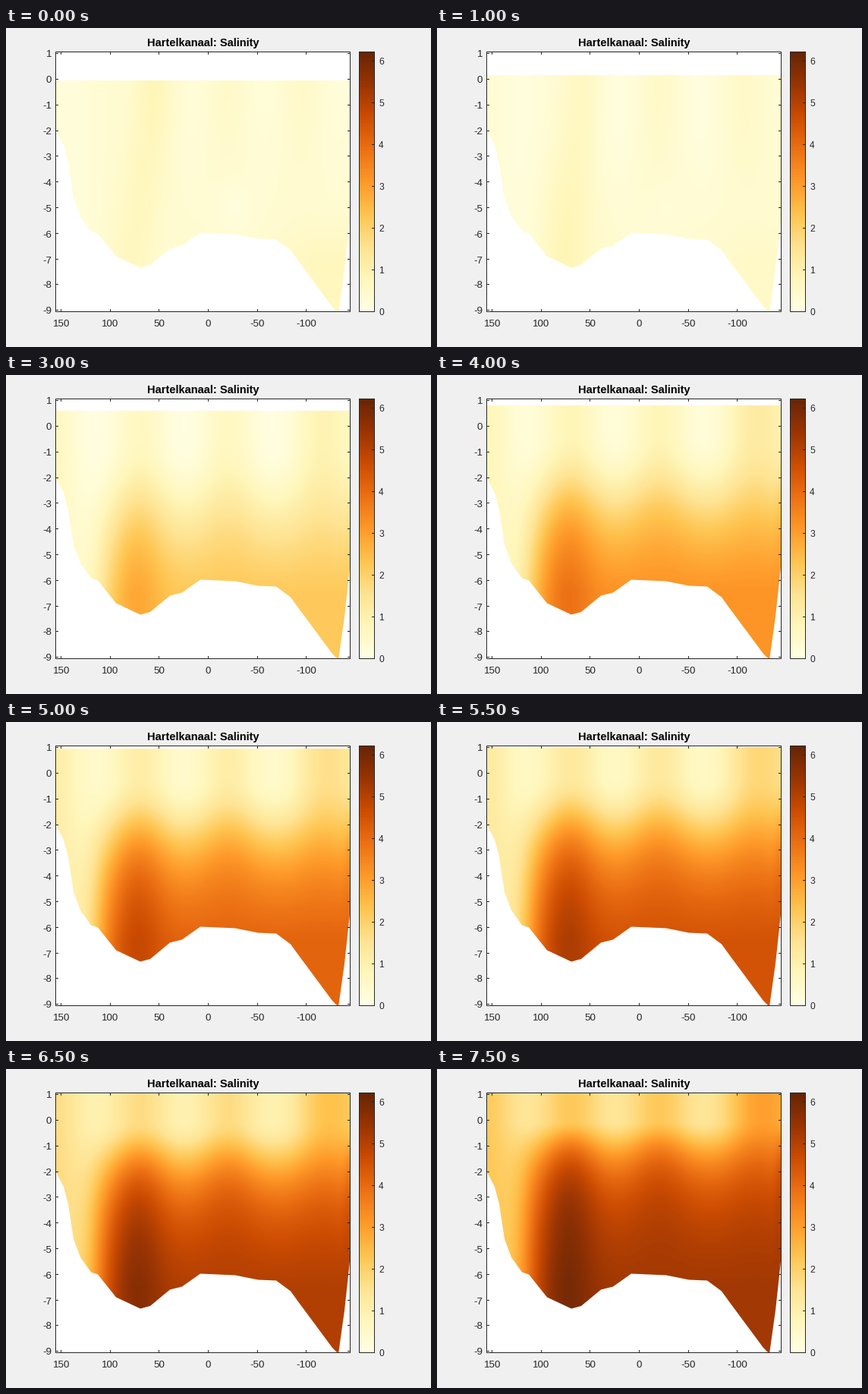
These frames come from a looping animation (560 by 420 pixels, 8000 ms). A matplotlib script:

```python
import numpy as np
import matplotlib.pyplot as plt
from matplotlib.animation import FuncAnimation
from matplotlib.patches import Polygon, Rectangle

W, H, DPI = 560, 420, 100
L, R, T, B = 65, 454, 31, 374        # plot box in pixels
BAR_L, BAR_R = 465, 486
FRAMES, STEP = 16, 500
TIDE = 2 * np.pi / 17800             # radians per ms
S_MAX = 6.225
INK = "#262626"

plt.rcParams["font.family"] = "Liberation Sans"


def px_x(v):
    return 266.5 - 1.292 * v


def px_y(v):
    return 67.5 - 33.8 * v


def rise(x, a, b):
    """Smooth step from 0 at a to 1 at b."""
    s = np.clip((x - a) / (b - a), 0, 1)
    return s * s * (3 - 2 * s)


def bell(x, mid, width):
    return np.exp(-((x - mid) / width) ** 2)


def sigmoid(x, mid, width):
    return 1 / (1 + np.exp(-(x - mid) / width))


def hill(d, mid, power):
    h = (d / mid) ** power
    return h / (1 + h)


X, Y = np.meshgrid(np.arange(L, R) + 0.5, np.arange(T, B) + 0.5)
DEEP = 6.5
depth = np.clip((Y - px_y(0)) / 33.8, 0, DEEP)
swell = np.cos(2 * np.pi * (X - 177) / 116)


def slack_water():
    """Almost fresh water with faint vertical bands."""
    bands = 0.14 * np.cos(2 * np.pi * (X - 195) / 97) * rise(X, 130, 200)
    ridge = 0.33 * bell(X + 0.13 * (Y - 69), 196, 28)
    seabed = 0.4 * rise(X, 320, 420) * rise(Y, 220, 330)
    pool = 0.22 * bell(X, 300, 25) * bell(Y, 235, 35)
    bank = 0.18 * bell(X, 80, 35)
    return 0.38 + bands * bell(depth, 0, 3.5) + ridge + seabed - pool - bank


def flood_water(t):
    """Salt wedge: a fresher top over a bottom that follows the tide."""
    u = np.clip((t - 1500) / 6000, 0, 1)
    top = (0.28 + 1.55 * u ** 2 + (0.25 + 0.13 * u) * swell
           + (0.25 + u) * rise(X, 370, 454))
    bottom = (2.4 + 2.9 * np.sin(TIDE * (t - 3200))
              + 0.7 * bell(X, 171, 35))
    mid = (4.25 - 2.65 * u ** 1.5 - 0.22 * swell
           + 0.7 * rise(X, 340, 420) - bell(X, 454, 9))
    power = 3.2 - 1.5 * u
    share = hill(depth, mid, power) / hill(DEEP, mid, power)
    share *= sigmoid(X, 124 - 8 * u, 13)
    return np.maximum(top + (bottom - top) * share, 0.05)


def salinity(i):
    t = i * STEP
    mix = min(t / 2000, 1)
    s = mix * flood_water(t) + (1 - mix) * slack_water()
    surface = np.round(52.9 - 22 * np.sin(TIDE * (t - 2250)))
    return np.ma.masked_where(Y < surface, s)


BED = [(L, 134), (76, 155), (82, 178), (89, 224), (98, 248), (112, 267.5),
       (121, 270.5), (145, 300.5), (177, 315.5), (190, 312), (216, 290.5),
       (232, 286.5), (256, 269.5), (302, 271.5), (332, 277.5), (356, 278.5),
       (375, 292.5), (384, 305), (430, 367), (438, 375), (446, 318), (R, 244)]

fig = plt.figure(figsize=(W / DPI, H / DPI), dpi=DPI, facecolor="#f0f0f0")
ax = fig.add_axes([0, 0, 1, 1])
ax.set_axis_off()


def line(x, y):
    ax.plot(x, y, color=INK, lw=0.72, solid_capstyle="butt", snap=False,
            zorder=4)


def label(x, y, text, px, **kw):
    kw = {"ha": "center", "va": "baseline", "color": INK, **kw}
    ax.text(x, y, text, fontsize=px * 72 / DPI, **kw)


def frame(l, r):
    ax.add_patch(Rectangle((l + 0.5, T + 0.5), r - l - 1, B - T - 1, snap=False,
                           fill=False, ec=INK, lw=0.72, zorder=4))


ax.add_patch(Rectangle((L, T), R - L, B - T, color="white", lw=0))
style = dict(cmap="YlOrBr", vmin=0, vmax=S_MAX, aspect="auto",
             interpolation="nearest")
water = ax.imshow(salinity(0), extent=(L, R, B, T), zorder=2, **style)
ax.add_patch(Polygon([(L, B)] + BED + [(R, B)], fc="white", lw=0, snap=False,
                     zorder=3))
ax.imshow(np.linspace(S_MAX, 0, 256)[:, None], extent=(BAR_L, BAR_R, B, T),
          zorder=2, **style)

for v in range(150, -101, -50):
    x = np.floor(px_x(v)) + 0.5
    line([x, x], [B, B - 4])
    line([x, x], [T, T + 4])
    label(px_x(v), 393, str(v), 13.33)
for v in range(-9, 2):
    y = np.floor(px_y(v)) + 0.5
    line([L, L + 4], [y, y])
    line([R, R - 4], [y, y])
    label(60, y + 5, str(v), 13.33, ha="right")
for v in range(7):
    y = min(np.floor(B - v * (B - T) / S_MAX) + 0.5, B - 0.5)
    line([BAR_R, BAR_R - 4], [y, y])
    label(491, y + 4.5, str(v), 12, ha="left")

frame(L, R)
frame(BAR_L, BAR_R)
label(260, 24, "Hartelkanaal: Salinity", 14.67, color="black", weight="bold")

ax.set_xlim(0, W)
ax.set_ylim(H, 0)


def update(i):
    water.set_data(salinity(i))
    return [water]


anim = FuncAnimation(fig, update, frames=FRAMES, interval=STEP,
                     repeat=True, repeat_delay=0)
plt.show()
```
